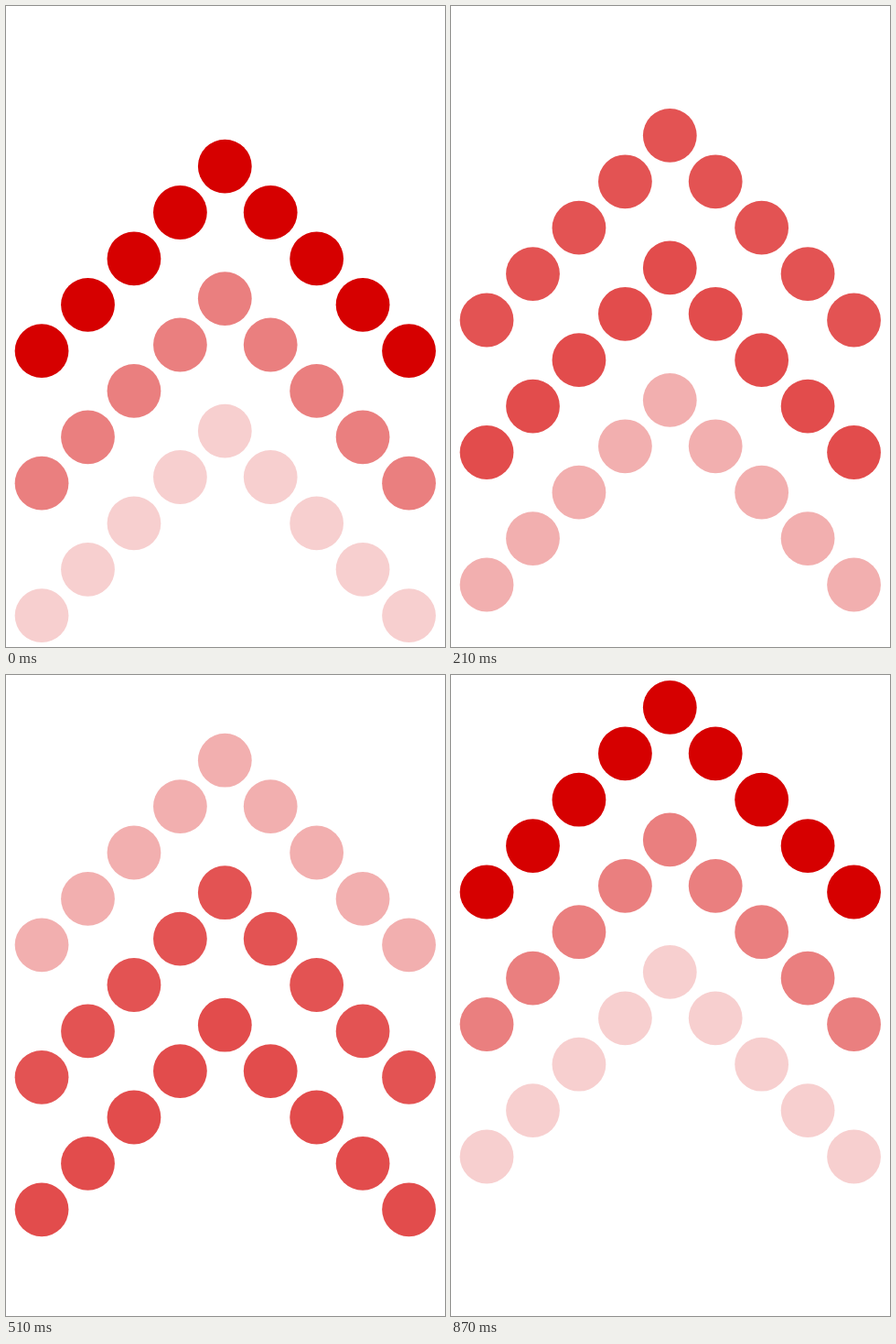
Write an HTML page with a canvas that moves like this. It is 480x700 px and loops after 900 ms.

```html
<!DOCTYPE html>
<html lang="en">
<head>
<meta charset="utf-8">
<title>Rising chevrons</title>
<style>
  html, body { margin: 0; width: 100%; height: 100%; overflow: hidden; background: #fff; }
  canvas { display: block; }
</style>
</head>
<body>
<canvas id="stage" width="480" height="700"></canvas>
<script>
const ctx = document.getElementById('stage').getContext('2d');
const LOOP = 900, STEP = 30, PHASE = 300;
const ROW_GAP = 144.5, RADIUS = 29.4;
const FADE_START = 180, FADE_TIME = 75;
const OPACITY = [1, 0.5, 0.19];

// Each row takes the previous row's opacity once per phase, with a short fade.
function opacity(row, time) {
  const shifted = time - FADE_START + PHASE;
  const phase = Math.floor(shifted / PHASE);
  const mix = Math.min(1, (shifted % PHASE) / FADE_TIME);
  const from = OPACITY[(row - phase + 4) % 3];
  const to = OPACITY[(row - phase + 3) % 3];
  return from + (to - from) * mix;
}

function dot(x, y) {
  ctx.beginPath();
  ctx.arc(x, y, RADIUS, 0, Math.PI * 2);
  ctx.fill();
}

function chevron(y) {
  dot(239.3, y);
  for (let k = 1; k <= 4; k++) {
    const dx = 50.45 * k - 1.05;
    dot(239.8 - dx, y + 50.4 * k);
    dot(239.8 + dx, y + 50.4 * k);
  }
}

function draw() {
  const time = Math.floor((performance.now() % LOOP) / STEP) * STEP;
  ctx.clearRect(0, 0, 480, 700);
  for (let row = 0; row < 3; row++) {
    ctx.fillStyle = `rgba(214, 0, 0, ${opacity(row, time)})`;
    chevron(175.1 + ROW_GAP * (row - time / LOOP));
  }
  requestAnimationFrame(draw);
}
draw();
</script>
</body>
</html>
```
